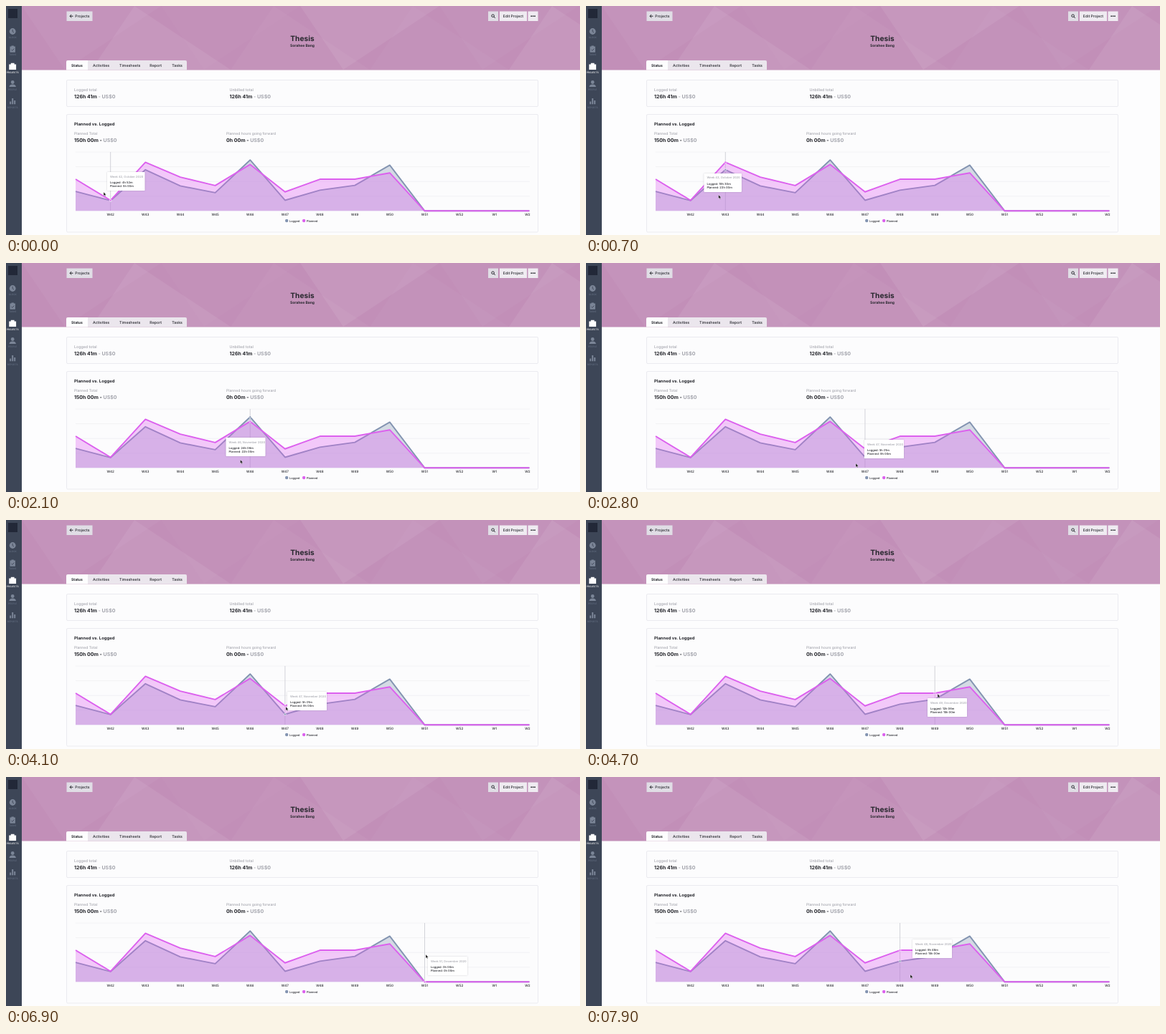
Write an HTML page that moves like this. It is 800 by 320 pixels and loops after 8000 ms.

```html
<!DOCTYPE html>
<html lang="en">
<head>
<meta charset="utf-8">
<title>Project status</title>
<style>
  html, body { margin: 0; width: 100%; height: 100%; overflow: hidden; background: #fdfdfe; }
  svg { display: block; }
  text { font-family: Inter, Roboto, sans-serif; font-weight: 500; fill: #25262c; text-rendering: geometricPrecision; }
  .mid { text-anchor: middle; }
  .bold { font-weight: 650; }
  .soft { fill: #a5a6ae; }
  .line { fill: none; stroke: #3d4657; stroke-width: .9; }
  #side text { font-size: 3.2px; fill: #667184; text-anchor: middle; }
  #side text:nth-of-type(3) { fill: #fff; }
</style>
</head>
<body>
<svg width="800" height="320">
  <!-- header -->
  <rect x="22" width="778" height="89.5" fill="#c28fb8"/>
  <g id="facets"></g>
  <text class="mid bold" x="413" y="49" font-size="10.2">Thesis</text>
  <text class="mid bold" x="413" y="57.3" font-size="5">Sorahee Bang</text>

  <!-- buttons -->
  <g transform="translate(0 7.5)" font-size="5.2">
    <path d="M84.5 0h36v13.5h-36zM672 0h14v13.5h-14z" fill="#e0dde5"/>
    <path d="M688 0h38v13.5h-38zM727.5 0h14v13.5h-14z" fill="#efebf1"/>
    <path d="M93.5 6.7h-4.5m2.2-2.2l-2.2 2.2l2.2 2.2M680 7.6l1.8 1.8" fill="none" stroke="#25262c"/>
    <circle cx="678.6" cy="6.2" r="1.8" fill="none" stroke="#25262c"/>
    <path d="M732.2 6.7h6" stroke="#25262c" stroke-width="1.8" stroke-linecap="round" stroke-dasharray="0 2.4"/>
    <text x="96.3" y="8.8">Projects</text>
    <text x="692.8" y="8.8">Edit Project</text>
  </g>

  <!-- tabs -->
  <path d="M114 76h136q2 0 2 2v11.5h-138z" fill="#ebe6ed"/>
  <path d="M84 89.5v-11.5q0-2 2-2h28v13.5z" fill="#fdfdfe"/>
  <g transform="translate(0 84.8)" font-size="5.25">
    <text class="bold" x="91" font-size="5">Status</text>
    <text x="121">Activities</text>
    <text x="158">Timesheets</text>
    <text x="200.3">Report</text>
    <text x="231.3">Tasks</text>
  </g>

  <!-- sidebar -->
  <rect width="22" height="320" fill="#3d4657"/>
  <rect x="3" y="4" width="13" height="13" fill="#222838"/>
  <g id="side" transform="translate(9.2 0)" fill="#7b8597">
    <circle cy="35.5" r="4.4"/>
    <path class="line" d="M0 32.8v3l1.8 1.2"/>
    <path d="M-3.7 56.5h2v-1h3.4v1h2v8.2h-7.4z"/>
    <path class="line" d="M-1.8 61l1.4 1.4l2.5-2.8"/>
    <path d="M-4.9 81.5h2.5v-1.8h4.8v1.8h2.5v7.5h-9.8z" fill="#fff"/>
    <circle cy="106.5" r="2.4"/>
    <path d="M-4.6 113q0-3.5 4.6-3.5t4.6 3.5z"/>
    <path d="M-4 137.2v-3.7h2v3.7zm3 0v-8.2h2v8.2zm3 0v-5.2h2v5.2z"/>
  </g>

  <!-- panels -->
  <g fill="#fcfcfd" stroke="#ebebf0">
    <rect x="84.5" y="103.5" width="657" height="37" rx="1.5"/>
    <rect x="84.5" y="151.5" width="657" height="164.5" rx="1.5"/>
  </g>
  <g transform="translate(0 119)" font-size="5.3">
    <text class="soft" x="95">Logged total</text>
    <text class="soft" x="311.5">Unbilled total</text>
  </g>
  <g transform="translate(0 179.6)" font-size="5">
    <text class="soft" x="95">Planned Total</text>
    <text class="soft" x="307">Planned hours going forward</text>
  </g>
  <text class="bold" x="95" y="167.3" font-size="5.9">Planned vs. Logged</text>
  <g font-size="7">
    <text class="bold" x="95" y="129.4">126h 41m <tspan class="soft">- US$0</tspan></text>
    <text class="bold" x="311.5" y="129.4">126h 41m <tspan class="soft">- US$0</tspan></text>
    <text class="bold" x="95" y="189.6">150h 00m - <tspan class="soft">US$0</tspan></text>
    <text class="bold" x="307" y="189.6">0h 00m - <tspan class="soft">US$0</tspan></text>
  </g>

  <!-- chart -->
  <g id="grid" stroke="#efeff3" stroke-width=".8"></g>
  <path id="rule" d="M0 204v82" stroke="#cdced5" stroke-width=".9"/>
  <g id="areas" stroke-width="1.9" stroke-linejoin="round"></g>
  <g id="weeks" font-size="4.6"></g>
  <g id="dots" stroke="#fff" stroke-width=".6">
    <circle r="1.4" fill="#8394b1"/>
    <circle r="1.4" fill="#dc60ee"/>
  </g>
  <g transform="translate(0 300)" font-size="3.95">
    <circle cx="391.2" r="2.2" fill="#8394b1"/>
    <circle cx="415.2" r="2.2" fill="#dc60ee"/>
    <text x="395" y="1.5">Logged</text>
    <text x="419" y="1.5">Planned</text>
  </g>

  <!-- tooltip and pointer -->
  <g id="tip" font-size="4.05">
    <rect height="26" rx=".8" fill="#fff" style="filter: drop-shadow(0 .6px 1px #2233)"/>
    <text class="soft" x="4" y="7.6"></text>
    <text x="4" y="15.9"></text>
    <text x="4" y="21.4"></text>
  </g>
  <path id="pointer" d="M0 0v5.2l1.2-1.1l.9 1.9l.8-.4l-.8-1.8h1.6z" fill="#111" stroke="#fff" stroke-width=".35"/>
</svg>
<script>
const $ = id => document.getElementById(id);
const repeat = (n, make) => Array.from({ length: n }, (_, i) => make(i)).join('');

// hours per week, from week 41 on; the rest are empty
const logged = [9.2, 4.87, 19.5, 11.83, 8.6, 24.1, 5.02, 9.8, 12.1, 21.66];
const planned = [15, 5, 23, 16, 12, 22, 9, 15, 15, 18];
const base = 286.3, left = 97, step = 48.65, count = 14;
const name = i => i < 12 ? 41 + i : i - 11;
const px = i => left + i * step;
const py = hours => base - (hours || 0) * 2.95;

function area(data, color) {
  const line = 'M' + repeat(count, i => `${px(i)} ${py(data[i])} `);
  return `<path d="${line}V${base}H${left}Z" fill="${color}" fill-opacity=".33"/>` +
    `<path d="${line}" fill="none" stroke="${color}"/>`;
}
$('areas').innerHTML = area(logged, '#8394b1') + area(planned, '#dc60ee');
$('grid').innerHTML = repeat(4, i => `<path d="M${left} ${204 + i * 20.6}H730"/>`);
$('weeks').innerHTML = repeat(count, i => i
  ? `<text class="mid" x="${Math.min(px(i), 727)}" y="292.6">W${name(i)}</text>` : '');
$('facets').innerHTML = repeat(8, i => {
  const x = 22 + i * 97, y = i % 2 * 89;
  return `<path d="M${x} ${y}h194L${Math.min(x + 60, 800)} ${89 - y}Z" fill="#fff" opacity="${.04 + .03 * Math.sin(i * 2)}"/>`;
});
$('side').innerHTML += ['CLOCK', 'TASKS', 'PROJECTS', 'PEOPLE', 'REPORTS']
  .map((s, i) => `<text y="${45 + i * 24.4}">${s}</text>`).join('');

// [ms, pointer x, y, tooltip x, y]
const keys = [
  [0, 136, 260, 141, 232],
  [550, 170, 263, 150, 233],
  [1050, 219, 266, 198, 236],
  [1300, 262, 267, 242, 237],
  [2000, 318, 274, 298, 243],
  [2550, 365, 279, 345, 248],
  [2800, 376, 280, 388, 247],
  [3600, 383, 278, 392, 248],
  [4100, 390, 261, 392, 240],
  [4500, 460, 248, 435, 252],
  [4700, 490, 243, 476, 249],
  [5100, 511, 254, 490, 250],
  [5350, 530, 262, 537, 233],
  [5700, 571, 250, 547, 231],
  [5900, 588, 247, 587, 250],
  [6900, 585, 248, 588, 251],
  [7900, 452, 276, 455, 227],
  [8000, 446, 278, 444, 238]
];

function pose(t) {
  const n = keys.findIndex(k => k[0] > t);
  const a = keys[n - 1], b = keys[n], u = (t - a[0]) / (b[0] - a[0]);
  return a.map((v, i) => v + (b[i] - v) * u);
}

const move = (el, x, y) => el.setAttribute('transform', `translate(${x} ${y})`);
function clock(hours = 0) {
  const m = Math.round(hours * 60);
  return `${Math.floor(m / 60)}h ${String(m % 60).padStart(2, '0')}m`;
}
const months = ['October', 'November', 'December', 'January'];

function draw() {
  const [, x, y, tipX, tipY] = pose(Math.floor(performance.now() % 8000 / 100) * 100);
  const week = Math.round((x - left) / step);
  move($('pointer'), x, y);
  move($('tip'), tipX, tipY);
  move($('rule'), px(week), 0);
  [logged, planned].forEach((data, i) => move($('dots').children[i], px(week), py(data[week])));

  const [box, title, log, plan] = $('tip').children;
  box.setAttribute('width', week < 4 ? 52.5 : 55);
  title.textContent = `Week ${name(week)}, ${months[week >> 2]} 2020`;
  log.textContent = 'Logged: ' + clock(logged[week]);
  plan.textContent = 'Planned: ' + clock(planned[week]);
  requestAnimationFrame(draw);
}
draw();
</script>
</body>
</html>
```
